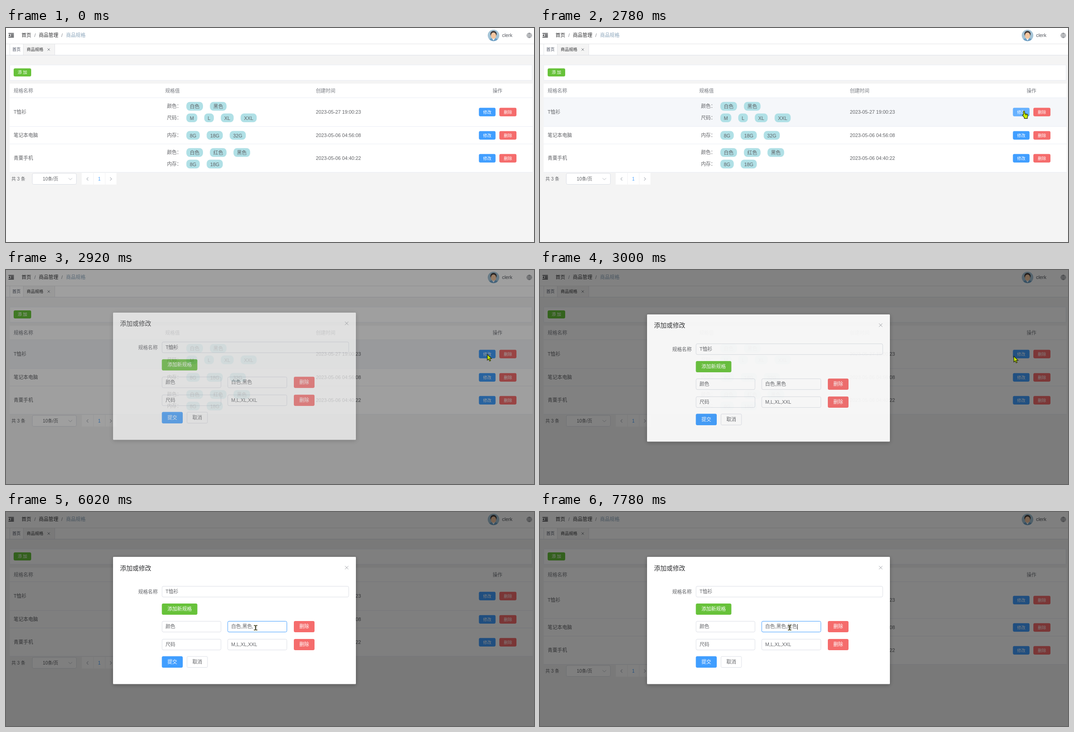
An HTML page that plays this animation: 1174x477 px, repeating every 8000 ms.

```html
<!DOCTYPE html>
<html lang="zh-CN">
<head>
<meta charset="utf-8">
<title>商品规格</title>
<style>
  html, body { margin: 0; width: 100%; height: 100%; overflow: hidden; background: #f4f4f4; }
  svg { display: block; width: 1174px; height: 477px; }
  text { font-family: "Liberation Sans", "Noto Sans CJK SC", "Noto Sans CJK", sans-serif; white-space: pre; }
</style>
</head>
<body>
<svg id="stage" viewBox="0 0 1174 477"></svg>
<script>
const LOOP = 8000;
const SIZE = 10.8, SMALL = 9.25;
const BLUE = '#409eff', RED = '#f56c6c', GREEN = '#67c23a';
const GREY = '#606266', LINE = '#ebeef5', EDGE = '#dcdfe6', PALE = '#b4b8bf';

// --- drawing helpers; text is placed by its vertical middle ---
const rect = (x, y, w, h, fill, extra = '') =>
  `<rect x="${x}" y="${y}" width="${w}" height="${h}" fill="${fill}" ${extra}/>`;
const label = (x, y, str, fill = GREY, size = SIZE, extra = '') =>
  `<text x="${x}" y="${y + size * 0.36}" font-size="${size}" fill="${fill}" ${extra}>${str}</text>`;
const path = (d, stroke, width = 1, extra = '') =>
  `<path d="${d}" fill="none" stroke="${stroke}" stroke-width="${width}" ${extra}/>`;
const cross = (x, y, r, stroke) =>
  path(`M${x - r} ${y - r}l${2 * r} ${2 * r}M${x + r} ${y - r}l${-2 * r} ${2 * r}`, stroke, 0.9);
const button = (x, y, w, h, fill, str, size = SIZE, id = '', ink = '#fff', edge = fill) =>
  rect(x + .5, y + .5, w - 1, h - 1, fill, `rx="2.2" stroke="${edge}" ${id && `id="${id}"`}`) +
  label(x + w / 2, y + h / 2, str, ink, size, `text-anchor="middle" font-weight="${edge === fill ? 500 : 400}"`);
const field = (x, y, w, str, id = '') =>
  rect(x + .5, y + .5, w - 1, 24, '#fff', `rx="3" stroke="${EDGE}" ${id && `id="${id}Box"`}`) +
  label(x + 8.3, y + 12.3, str, GREY, SIZE, id && `id="${id}"`);

// --- page parts ---
const ADVANCE = { G: .778, M: .833, L: .556, X: .667 };
const textWidth = str => [...str].reduce((sum, c) =>
  sum + SIZE * (c > '\u2fff' ? 1 : ADVANCE[c] || .556), 0);

function tagLine(y, name, tags) {
  let x = 401, out = label(358, y, name + '：');
  for (const tag of tags) {
    const w = textWidth(tag) + 15.4;
    out += rect(x, y - 9.8, w, 19.6, '#b0e0e6', 'rx="7.7"') +
      label(x + w / 2, y + .6, tag, GREY, SIZE, 'text-anchor="middle"');
    x += w + 15.4;
  }
  return out;
}

const rows = [
  { top: 155, bottom: 219, name: 'T恤衫', date: '2023-05-27 19:00:23',
    specs: [['颜色', '白色', '黑色'], ['尺码', 'M', 'L', 'XL', 'XXL']] },
  { top: 219, bottom: 258, name: '笔记本电脑', date: '2023-05-06 04:56:08',
    specs: [['内存', '8G', '18G', '32G']] },
  { top: 258, bottom: 321, name: '青粟手机', date: '2023-05-06 04:40:22',
    specs: [['颜色', '白色', '红色', '黑色'], ['内存', '8G', '18G']] },
];

function tableRow(row, i) {
  const mid = Math.round((row.top + row.bottom) / 2);
  const first = mid + .3 - (row.specs.length - 1) * 12.8;
  return `<g id="row${i}">` +
    rect(8, row.top + 1, 1163, row.bottom - row.top, '#fff', `id="back${i}"`) +
    `<g id="cells${i}">` +
    label(17, mid, row.name) + label(689, mid, row.date) +
    row.specs.map(([name, ...tags], n) => tagLine(first + n * 25.7, name, tags)).join('') +
    button(1051.5, mid - 9.2, 37, 19, BLUE, '修改', SMALL, 'edit' + i) +
    button(1097, mid - 9.2, 38, 19, RED, '删除', SMALL) +
    '</g>' + rect(8, row.bottom, 1163, 1, LINE, `id="rule${i}"`) + '</g>';
}

function header() {
  return rect(0, 0, 1174, 61, '#fff') + rect(0, 35, 1174, 1, '#e3e4e6') + rect(0, 60, 1174, 1, '#dde0e7') +
    path('M5.5 12h12M10.5 14.8h7M10.5 17.6h7M5.5 20.4h12', '#34363a', 1.7) +
    '<path d="M9 13.6v5.2l-3.5-2.6z" fill="#34363a"/>' +
    label(34.5, 16.5, '首页', '#303133') + label(63, 16.5, '/', '#7d8188') +
    label(73, 16.5, '商品管理', '#303133') + label(123, 16.5, '/', '#7d8188') +
    label(133.5, 16.5, '商品规格', '#8ba5bb') +
    '<clipPath id="round"><circle cx="1084" cy="16.5" r="12.8"/></clipPath>' +
    '<g clip-path="url(#round)">' + rect(1071, 3, 26, 27, '#a3c3d6') +
    '<path d="M1073 31c0-7 5-8.500 11-8.500s11 1.500 11 8.500z" fill="#6d9fc4"/>' +
    '<path d="M1080 22l4 6 4-6z" fill="#f4f6f8"/><circle cx="1084" cy="13.500" r="7" fill="#3f3a3a"/>' +
    '<ellipse cx="1084" cy="17" rx="5.800" ry="7" fill="#f3c6a0"/></g>' +
    label(1103, 16.5, 'clerk', '#51555c') +
    path('M1158 16.500a5.500 5.500 0 1 0 11 0a5.500 5.500 0 1 0-11 0zM1158 16.500h11M1163.500 11v11M1159 13.600h9M1159 19.400h9' +
      'M1163.500 11c-3.700 3-3.700 8 0 11c3.700-3 3.700-8 0-11', '#70747a', .8) +
    // tabs
    path('M8.500 36v24', '#e2e4e8') + rect(39, 36, 69, 24, '#f4f4f4') +
    path('M38.500 36v24M108.500 36v24', '#e2e4e8') +
    label(14, 48, '首页', '#495060', SMALL) + label(46, 48, '商品规格', '#303133', SMALL) +
    cross(95, 48, 2.6, '#63676e');
}

function page() {
  const head = (x, str) => label(x, 140, str, '#777a80', SIZE, 'font-weight="500"');
  return rect(0, 0, 1174, 477, '#f4f4f4') + header() +
    rect(8.5, 82.5, 1161, 34, '#fff', `stroke="${LINE}"`) +
    button(17, 90, 39, 18, GREEN, '添 加', SMALL) +
    rect(8, 124, 1163, 32, '#fff') +
    head(17, '规格名称') + head(354, '规格值') + head(689, '创建时间') + head(1082, '操作') +
    rows.map(tableRow).join('') + rect(8, 155, 1163, 1, LINE) +
    '<g id="pager">' + label(12, 336.3, '共 3 条', GREY, 10) +
    rect(58.5, 324, 98, 24.5, '#fff', `rx="3" stroke="${EDGE}"`) +
    label(99, 336.5, '10条/页', GREY, 10.2, 'text-anchor="middle"') +
    path('M139 334.500l4 4 4-4', PALE) +
    rect(168.5, 323, 77, 26, '#fff') + path('M194.500 323v26M220.500 323v26', '#f1f1f3') +
    path('M183 333l-3.500 3.500 3.500 3.500M231.500 333l3.500 3.500-3.500 3.500', PALE, 1.1) +
    label(207.5, 336.5, '1', BLUE, 10, 'text-anchor="middle"') + '</g>';
}

function dialog() {
  const remove = y => button(640, y, 46, 25, RED, '删除');
  return '<filter id="shade" x="-10%" y="-10%" width="120%" height="125%">' +
    '<feDropShadow dx="0" dy="2" stdDeviation="5" flood-opacity=".28"/></filter>' +
    '<g id="dialog">' + rect(238, 100, 540, 283.5, '#fff', 'rx="1.500" filter="url(#shade)"') +
    label(253.5, 124.5, '添加或修改', '#303133', 13.9) + cross(757.5, 124, 3.7, '#909399') +
    label(294, 177.8, '规格名称') + field(346.5, 165, 416, 'T恤衫') +
    button(346.5, 204, 79, 25, GREEN, '添加新规格', SIZE, 'addSpec') +
    field(346.5, 243, 132, '颜色') + field(492.5, 243, 132.5, '', 'values') + remove(243) +
    field(346.5, 283, 132, '尺码') + field(492.5, 283, 132.5, 'M,L,XL,XXL') + remove(283) +
    button(346.5, 321.5, 46.5, 25.5, BLUE, '提交') +
    button(402, 321.5, 46.5, 25.5, '#fff', '取消', SIZE, '', GREY, EDGE) +
    rect(0, 250, 1, 12, '#222', 'id="caret"') + '</g>';
}

const pointers =
  '<g id="cursor"><path id="arrow" d="M0 0v13l3-2.700 2.200 4.700 2.300-1-2.200-4.600h4.200z" fill="#c3e600" stroke="#1c2208" stroke-width="1.100"/>' +
  '<path id="hand" d="M-1 0c1.400 0 1.700.800 1.700 1.800v4l5.500 1.200c1.300.400 1.700 1.200 1.500 2.400l-.900 4.600v2.600h-7v-2.100l-3.600-4.300c-.900-1.300.300-2.500 1.600-1.600V1.800C-2.500.800-2 0-1 0zM2.700 7v2.500M5 7.500v2.300" fill="#cdf000" stroke="#1c2208" stroke-width="1.100"/>' +
  '<path id="beam" d="M-4-6h3l1 .700 1-.700h3v2h-2.700v8h2.700v2h-3l-1-.700-1 .700h-3v-2h2.700v-8h-2.700z" fill="#45452f" stroke="#d8d8c8" stroke-width=".4"/></g>';

document.getElementById('stage').innerHTML =
  page() + rect(0, 0, 1174, 477, '#000', 'id="veil"') + dialog() + pointers;

// --- motion ---
const $ = id => document.getElementById(id);
const set = (id, name, value) => $(id).setAttribute(name, value);
const show = (id, on) => set(id, 'visibility', on ? 'visible' : 'hidden');
const within = (t, a, b) => t >= a && t < b;
const clamp = v => Math.max(0, Math.min(1, v));

// CSS "ease": cubic-bezier(.25, .1, .25, 1)
function ease(x) {
  x = clamp(x);
  let lo = 0, hi = 1, s;
  for (let i = 0; i < 18; i++) {
    s = (lo + hi) / 2;
    const at = .75 * s * (1 - s) ** 2 + .75 * s * s * (1 - s) + s ** 3;
    if (at < x) lo = s; else hi = s;
  }
  return .3 * s * (1 - s) ** 2 + 3 * s * s * (1 - s) + s ** 3;
}

const track = [
  [130, 640, 474], [550, 527, 176], [960, 527, 176], [1430, 1028, 192], [1590, 1028, 192],
  [1840, 1077, 185], [2780, 1077, 185], [2880, 1078, 186], [3000, 1055, 192], [3330, 564, 206],
  [3860, 404, 200], [3930, 412, 212], [4130, 548, 256], [4230, 555, 258],
];
function cursorAt(t) {
  const i = track.findIndex(p => p[0] > t);
  if (i < 1) return track[i < 0 ? track.length - 1 : 0].slice(1);
  const [t0, x0, y0] = track[i - 1], [t1, x1, y1] = track[i];
  const k = (t - t0) / (t1 - t0);
  return [x0 + (x1 - x0) * k, y0 + (y1 - y0) * k];
}

const typing = [[0, '白色,黑色'], [5490, '白色,黑色,'], [6220, '白色,黑色,h'], [6290, '白色,黑色,ho'],
  [6620, '白色,黑色,hon'], [6820, '白色,黑色,hong'], [7020, "白色,黑色,hong's"],
  [7220, "白色,黑色,hong'se"], [7360, '白色,黑色,红色']];

function draw(t) {
  const [x, y] = cursorAt(t);
  const open = t >= 2830;

  // table
  const grow = within(t, 6220, 6620) || t >= 7360 ? 18 : 0;
  rows.forEach((row, i) => {
    const hover = t >= 130 && t < 3000 && y > row.top && y <= row.bottom;
    set('back' + i, 'fill', hover ? '#f5f7fa' : '#fff');
    if (i) set('row' + i, 'transform', `translate(0 ${grow})`);
  });
  set('back0', 'height', 64 + grow);
  set('cells0', 'transform', `translate(0 ${grow / 2})`);
  set('rule0', 'transform', `translate(0 ${grow})`);
  set('pager', 'transform', `translate(0 ${grow})`);
  const onEdit = within(t, 1720, 2830);
  const editFill = within(t, 2520, 2620) ? '#3a8ee6' : onEdit ? '#66b1ff' : BLUE;
  set('edit0', 'fill', editFill);
  set('edit0', 'stroke', editFill);

  // dialog
  const p = ease((t - 2787) / 300);
  set('veil', 'opacity', .5 * ease((t - 2830) / 200));
  set('dialog', 'opacity', p ** 1.3);
  set('dialog', 'transform', `translate(0 ${-20 * (1 - p)})`);
  const addFill = within(t, 3885, 3955) ? '#85ce61' : GREEN;
  set('addSpec', 'fill', addFill);
  set('addSpec', 'stroke', addFill);

  // edited field
  const inField = t >= 4090;
  set('valuesBox', 'stroke', t >= 4400 ? BLUE : inField ? '#c0c4cc' : EDGE);
  const text = typing.filter(step => step[0] <= t).pop()[1];
  if ($('values').textContent !== text) $('values').textContent = text;
  set('caret', 'x', Math.round(500.8 + $('values').getComputedTextLength()));
  show('caret', within(t, 4540, 5070) || within(t, 5490, 6020) || t >= 6220);

  // pointer
  set('cursor', 'transform', `translate(${x} ${y})`);
  const seen = t >= 130;
  show('hand', seen && onEdit);
  show('beam', inField);
  show('arrow', seen && !onEdit && !inField);
}

const start = performance.now();
function tick() {
  draw((performance.now() - start) % LOOP);
  requestAnimationFrame(tick);
}
tick();
</script>
</body>
</html>
```
